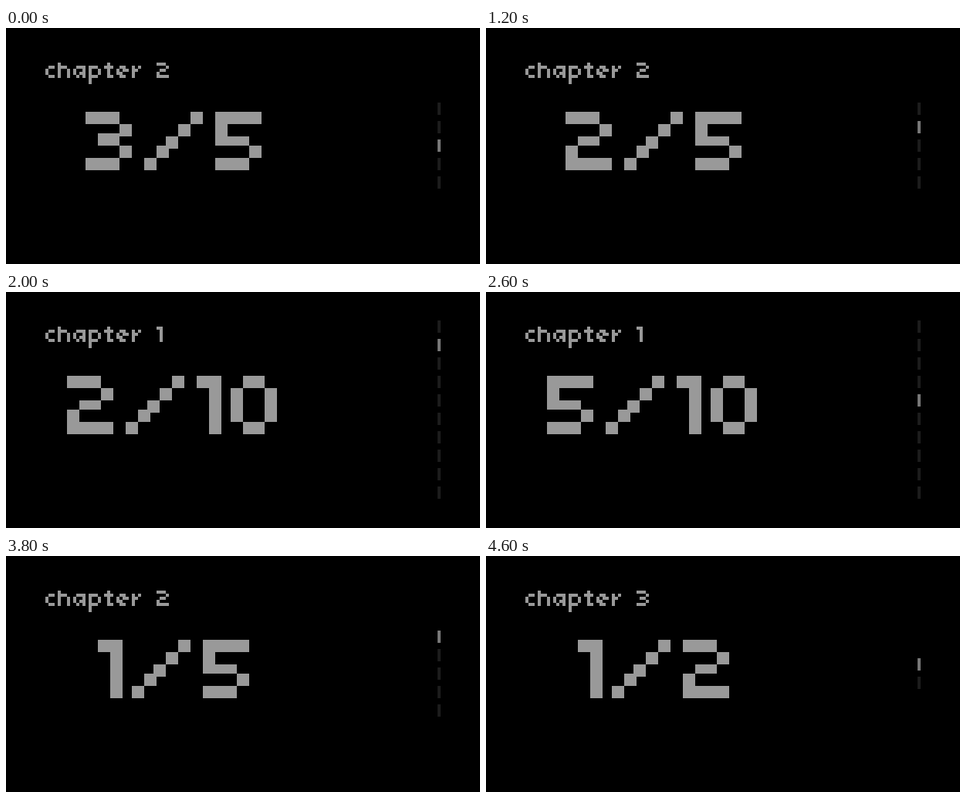
An HTML page with a canvas for the animation above (4.8 s loop, 614 px wide and 307 px high).

```html
<!DOCTYPE html>
<html lang="en">
<head>
<meta charset="utf-8">
<title>Chapter pager</title>
<style>
html, body { margin: 0; width: 100%; height: 100%; overflow: hidden; background: #000; }
canvas { display: block; }
</style>
</head>
<body>
<canvas id="stage" width="614" height="307" role="img" aria-label="chapter and page counter"></canvas>
<script>
const ctx = document.getElementById('stage').getContext('2d');

const STEP = 200;
const LOOP = 4800;
const INK = '#999', ACTIVE = '#777', IDLE = '#1c1c1c';
const PAGES = { 1: 10, 2: 5, 3: 2 };

// Rows of each glyph, top to bottom.
const DIGITS = {
  0: '.XX. X..X X..X X..X .XX.',
  1: 'XX .X .X .X .X',
  2: 'XXX. ...X .XX. X... XXXX',
  3: 'XXX. ...X .XX. ...X XXX.',
  4: 'X.X. X.X. XXXX ..X. ..X.',
  5: 'XXXX X... XXX. ...X XXX.',
  6: '.XX. X... XXX. X..X .XX.',
  7: 'XXXX ...X ..X. .X.. .X..',
  8: '.XX. X..X .XX. X..X .XX.',
  9: '.XX. X..X .XXX ...X .XX.'
};
const LETTERS = {
  c: '... .XX X.. X.. .XX',
  h: 'X... XXX. X..X X..X X..X',
  a: '.... .XXX X..X X.XX .X.X',
  p: '.... XXX. X..X X..X XXX. X... X...',
  t: '.X. XXX .X. .X. .XX',
  e: '.... .XX. X.XX XX.. .XX.',
  r: '... X.X XX. X.. X..',
  ' ': '...'
};

// Each stop: start step, chapter, page.
const STOPS = [
  [0, 2, 3], [1, 2, 4], [2, 2, 5], [4, 2, 4], [5, 2, 3], [6, 2, 2], [7, 2, 1],
  [8, 1, 2]
];
for (let page = 1; page <= 10; page++) STOPS.push([8 + page, 1, page]);
STOPS.push([19, 2, 1], [20, 3, 1], [21, 3, 2], [23, 3, 1]);

// The screen is made of 4px dots.
function dots(x, y, w, h) {
  ctx.fillRect(51 + 4 * x, 25 + 4 * y, 4 * w, 4 * h);
}

function eachDot(glyph, draw) {
  glyph.split(' ').forEach((row, r) => {
    [...row].forEach((dot, c) => { if (dot === 'X') draw(c, r); });
  });
}

function smallText(text, x, y) {
  for (const ch of text) {
    const glyph = ch === ' ' ? '...' : LETTERS[ch] || DIGITS[ch];
    eachDot(glyph, (c, r) => dots(x + c, y + r, 1, 1));
    x += glyph.split(' ')[0].length + 1;
  }
}

const EDGES = [0, 4, 8, 11, 15, 19];
const MIDDLE = { 3: [7, 11], 6: [7, 11], 9: [8, 12] };
const advance = ch => ch === '/' ? 23 : ch === '1' ? 11 : 19;

function bigSlash(x, y) {
  [[15, 0], [11, 4], [7, 8], [4, 11], [0, 15]]
    .forEach(([dx, dy]) => dots(x + dx, y + dy, 4, 4));
}

function bigDigit(ch, x, y) {
  eachDot(DIGITS[ch], (c, r) => {
    const [top, bottom] = r === 2 && MIDDLE[ch] || [EDGES[r], EDGES[r + 1]];
    dots(x + EDGES[c], y + top, EDGES[c + 1] - EDGES[c], bottom - top);
  });
}

function bigText(text, center, y) {
  const width = [...text].reduce((sum, ch) => sum + advance(ch), 0);
  let x = Math.floor(center - width / 2);
  for (const ch of text) {
    if (ch === '/') bigSlash(x, y);
    else bigDigit(ch, x, y);
    x += advance(ch);
  }
}

function render(time) {
  const step = Math.floor((time % LOOP) / STEP);
  const [, chapter, page] = STOPS.filter(stop => stop[0] <= step).pop();
  const count = PAGES[chapter];

  ctx.fillStyle = '#000';
  ctx.fillRect(0, 0, 614, 307);

  ctx.fillStyle = INK;
  smallText('chapter ' + chapter, 0, 5);
  bigText(page + '/' + count, 43.5, 21);

  for (let i = 0; i < count; i++) {
    ctx.fillStyle = i + 1 === page ? ACTIVE : IDLE;
    dots(127, 33 - 3 * count + 6 * i, 1, 4);
  }
}

const start = performance.now();
function tick() {
  render(performance.now() - start);
  requestAnimationFrame(tick);
}
tick();
</script>
</body>
</html>
```
